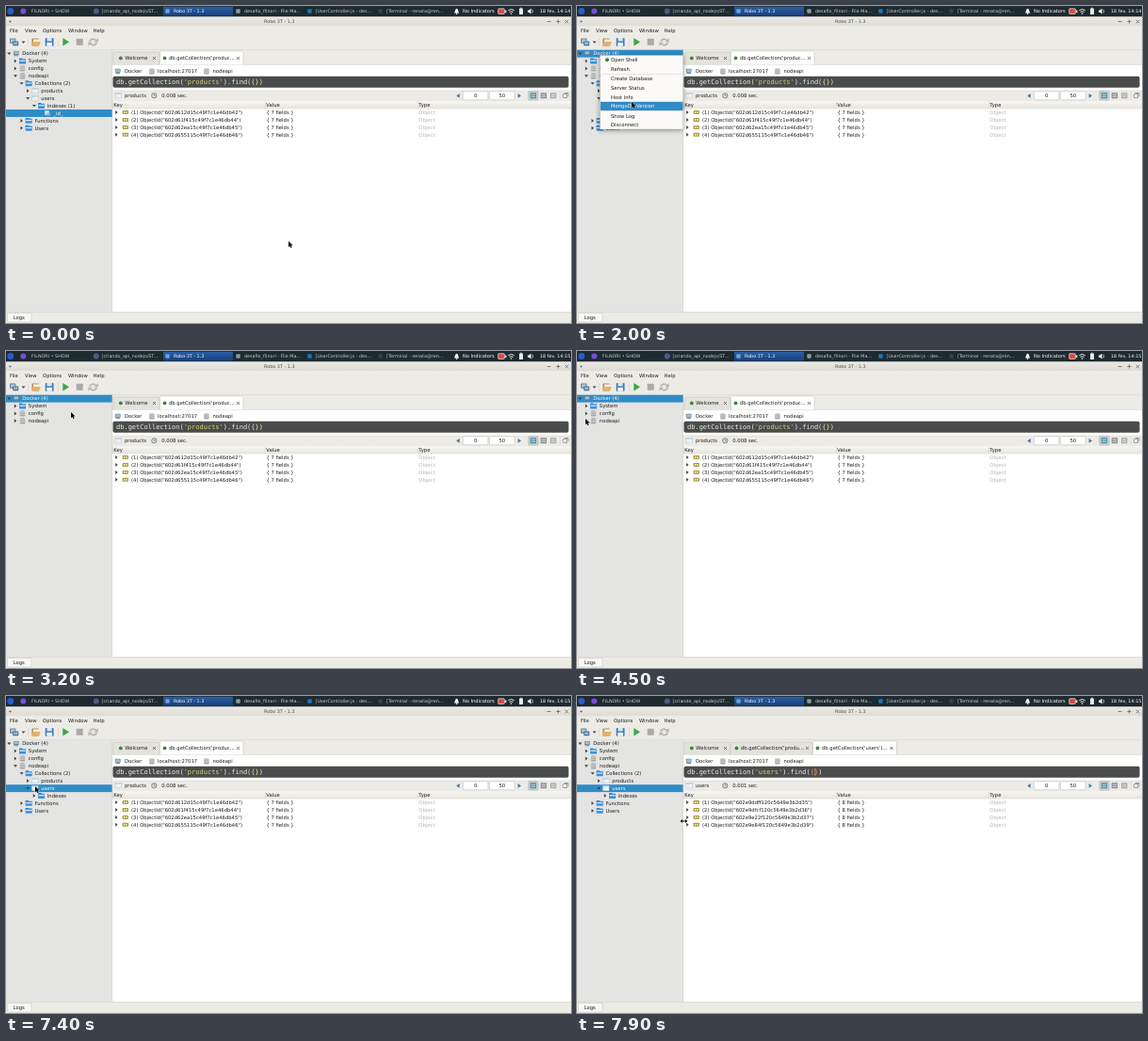
Recreate the animation shown at these times as an HTML page. Size 600 by 337 pixels, loop 8000 ms.

```html
<!DOCTYPE html>
<html lang="en">
<head>
<meta charset="utf-8">
<title>Database browser</title>
<style>
html, body { margin: 0; width: 100%; height: 100%; overflow: hidden; background: #edebe5; }
svg { display: block; width: 100vw; height: 100vh; }
text { font: 5.27px "DejaVu Sans", sans-serif; fill: #1c1c1c; text-rendering: geometricPrecision; white-space: pre; }
.task { font-size: 4.85px; fill: #c3cccf; }
.task.on { fill: #fff; }
.title { font-size: 4.9px; fill: #505050; }
.code { font: 7.01px "DejaVu Sans Mono", monospace; fill: #ececea; }
.picked { fill: #fff; }
.shadow { filter: drop-shadow(0 1.5px 2.5px #0006); }
</style>
</head>
<body>
<svg id="stage" viewBox="0 0 600 337" preserveAspectRatio="none">
  <defs>
    <linearGradient id="head" x2="0" y2="1"><stop stop-color="#f7f6f3"/><stop offset="1" stop-color="#e6e4de"/></linearGradient>
    <linearGradient id="bar" x2="0" y2="1"><stop stop-color="#ebe9e4"/><stop offset="1" stop-color="#dfdcd5"/></linearGradient>
    <linearGradient id="active" x2="0" y2="1"><stop stop-color="#2a5fa8"/><stop offset="1" stop-color="#193f78"/></linearGradient>
    <pattern id="stripes" width="7.3" height="6.4" patternUnits="userSpaceOnUse" x="322" y="204.3">
      <rect width="7.3" height="6.4" fill="#f0f0ee"/><path d="M0 6.4L3.2 0H7L3.8 6.4Z" fill="#747472"/>
    </pattern>
  </defs>
  <g id="frame"></g>
  <g id="tools"></g>
  <g id="tree"></g>
  <g id="doc"></g>
  <g id="menu"></g>
  <g id="pointer"></g>
</svg>
<script>
const LOOP = 8000, STEP = 100, BLUE = '#308cc6', GREEN = '#3c8436';
const $ = id => document.getElementById(id);

// Drawing helpers
const rect = (x, y, w, h, fill, more = '') =>
  `<rect x="${x}" y="${y}" width="${w}" height="${h}" fill="${fill}" ${more}/>`;
const dot = (x, y, r, fill) => `<circle cx="${x}" cy="${y}" r="${r}" fill="${fill}"/>`;
const path = (d, fill, more = '') => `<path d="${d}" fill="${fill}" ${more}/>`;
const line = (d, color, w = 0.6) => path(d, 'none', `stroke="${color}" stroke-width="${w}"`);
const text = (x, y, s, more = '') => `<text x="${x}" y="${y + 1.85}" ${more}>${s}</text>`;
const cross = (x, y, r, color, w) => line(`M${x - r} ${y - r}l${2 * r} ${2 * r}m0 ${-2 * r}l${-2 * r} ${2 * r}`, color, w);

const icons = {
  host: (x, y) => rect(x + 0.6, y - 2.7, 5.6, 4, '#6f7f8b', 'rx=".5"') + rect(x + 1.2, y - 2.1, 4.4, 2.7, '#9cc0d8') +
    rect(x + 1.2, y + 1.7, 4.4, 0.9, '#70797f'),
  folder: (x, y) => rect(x, y - 3, 3.4, 2, '#2a7bc8', 'rx=".4"') + rect(x, y - 2.3, 7, 5.2, '#3a8edb', 'rx=".5"') +
    rect(x + 0.5, y - 0.9, 6, 1.2, '#dceefa'),
  db: (x, y) => rect(x + 0.7, y - 3, 5.4, 6.1, '#a3a5a5', 'rx="1.3"') +
    line(`M${x + 0.9} ${y - 1.4}h5M${x + 0.9} ${y + 0.8}h5`, '#eee', 0.7),
  table: (x, y) => rect(x + 0.2, y - 2.7, 6.5, 5.3, '#f6fafc', 'stroke="#a9bac4" stroke-width=".4"') +
    rect(x + 0.2, y - 2.7, 6.5, 1.3, '#b5d3e5') + line(`M${x + 2.4} ${y - 1.4}v4M${x + 0.2} ${y + 0.6}h6.5`, '#c5d3da', 0.4),
  index: (x, y) => rect(x + 0.5, y - 2.7, 4.6, 4.4, '#d9e6ee', 'rx=".4"') + rect(x + 2.8, y - 0.4, 3.4, 3, '#a5b4be', 'rx=".4"'),
  object: (x, y) => rect(x + 0.2, y - 2, 6.4, 4, '#a89a45', 'rx=".8"') + rect(x + 1.6, y - 1, 1.3, 2, '#f4eebc') +
    rect(x + 3.9, y - 1, 1.3, 2, '#f4eebc')
};

const twist = (x, y, open) => path(open
  ? `M${x - 2} ${y - 1.1}h4l-2 2.4Z` : `M${x - 1.1} ${y - 2}v4l2.4 -2Z`, '#3f3f3f');

// Panel, title bar, menu bar and status bar
function drawFrame(clock) {
  const tasks = [
    [27, 'FILNORI • SHOW', 18.3, '#7d49e0'], [101.5, '[criando_api_nodejs/ST...', 95.8, '#4b5c86'],
    [178, 'Robo 3T - 1.3', 171.5, '#6f9fdc'], [253, 'desafio_filnori - File Ma...', 246.5, '#8a9aa5'],
    [328.5, '[UserController.js - des...', 322.5, '#1679c4'], [404, '[Terminal - renata@ren...', 397.5, '#34454d']
  ];
  let s = rect(0, 0, 600, 11.5, '#1d2a2f') + rect(167, 0.8, 74, 9.8, 'url(#active)') + dot(4.8, 5.5, 3.4, '#2a5bd0');
  tasks.forEach(([x, label, ix, color], i) => {
    s += i > 1 ? rect(ix - 2.2, 3.3, 4.4, 4.4, color, 'rx="1"') : dot(ix, 5.5, 3, color);
    s += text(x, 5.5, label, `class="task ${i == 2 ? 'on' : ''}"`);
  });
  s += path('M476 7.4c1-1 .9-4.6 2.6-4.6s1.6 3.6 2.6 4.6Z', '#fff') + dot(478.6, 8.3, 0.8, '#fff') +
    text(485, 5.5, 'No Indicators', 'class="task on" style="font-size:5.1px"') +
    rect(522.7, 2.8, 6.6, 5.6, '#d6483c', 'stroke="#eee" stroke-width=".7" rx=".6"') + path('M529.3 5.4l2-1.4v3.6l-2-1.4Z', '#eee') +
    line('M533.3 4.7q3.2-2.6 6.4 0M534.5 6.4q2-1.5 4 0', '#fff', 0.9) + dot(536.5, 8, 0.8, '#fff') +
    rect(545, 2.5, 4, 6.5, '#dfeedd', 'rx=".6"') + rect(546.2, 1.7, 1.6, 1, '#dfeedd') +
    path('M554 4.4h1.5l2-1.8v6l-2-1.8h-1.5Z', '#fff') + line('M558.8 3.7q1.6 1.9 0 3.8', '#fff', 0.7) +
    text(567, 5.5, '18 fev, ' + clock, 'class="task on"');

  s += rect(0, 11.5, 600, 9.7, 'url(#bar)') + text(274, 16.6, 'Robo 3T - 1.3', 'class="title"') +
    path('M2.8 15.8h3.2l-1.6 1.9Z', '#666') + line('M574.5 16.5h4M584.3 16.5h4.2M586.4 14.4v4.2', '#666', 0.8) +
    cross(595.5, 16.5, 1.8, '#666', 0.8);
  s += rect(0, 21.2, 600, 315.8, '#edebe5');
  [[4, 'File'], [20, 'View'], [39, 'Options'], [66, 'Window'], [92.5, 'Help']]
    .forEach(([x, label]) => s += text(x, 25.7, label));
  s += rect(0, 46, 600, 0.5, '#d2d0ca') + rect(0, 325, 600, 0.5, '#cfcdc7') +
    rect(1.5, 326.4, 25.5, 9.6, '#f8f7f5', 'stroke="#c2c0ba" stroke-width=".5" rx="1"') + text(7.7, 331.5, 'Logs');
  $('frame').innerHTML = s;
}

function drawTools(busy) {
  const stop = busy ? '#dd4f28' : '#a9a9a7', play = busy ? '#b0b0ae' : '#3ea548';
  $('tools').innerHTML =
    rect(4, 34.5, 6.4, 5.2, '#6d7c87', 'rx=".6"') + rect(4.9, 35.4, 4.6, 3.2, '#9fcbe8') + rect(7.2, 37.6, 6, 4.6, '#4a6c86', 'rx=".6"') +
    rect(8, 38.4, 4.4, 2.7, '#8db6d2') + path('M16.5 37.4h4l-2 2.4Z', '#444') + rect(23.5, 34, 0.5, 9, '#cfcdc6') +
    rect(27.4, 34.4, 7.4, 8, '#b98a4e', 'rx=".6"') + rect(29, 35.4, 6, 3, '#f3efe6') + path('M28.4 38h8.2l-1.4 4.5h-7.8Z', '#e2b268') +
    rect(41.7, 34, 8.8, 8.8, '#3d78b8', 'rx=".8"') + rect(43.5, 34, 5.2, 3.4, '#d7e6f3') + rect(43.2, 38.8, 5.8, 4, '#eef4fa') +
    rect(55, 34, 0.5, 9, '#cfcdc6') + path('M60.3 34v8.6l6.8-4.3Z', play) + rect(74.7, 34.8, 7, 7, stop, 'rx=".5"') +
    line('M88.7 37.4q3.4-4 7-.8M96.5 39.4q-3.4 4-7 .8', '#b4b4b1', 1.7) +
    path('M97.8 34v4.4h-4.2ZM87.4 42.8v-4.4h4.2Z', '#b4b4b1');
}

// Tree: label, depth, icon, has children, minimum level of expansion
const nodes = [
  ['Docker (4)', 0, 'host', 1, 0], ['System', 1, 'folder', 1, 0], ['config', 1, 'db', 1, 0], ['nodeapi', 1, 'db', 1, 0],
  ['Collections', 2, 'folder', 1, 1], ['products', 3, 'table', 1, 2], ['users', 3, 'table', 1, 2],
  ['Indexes', 4, 'folder', 1, 3], ['_id_', 5, 'index', 0, 4],
  ['Functions', 2, 'folder', 1, 1], ['Users', 2, 'folder', 1, 1]
];
const opensAt = { 'Docker (4)': 0, nodeapi: 1, Collections: 2, users: 3, Indexes: 4 };

function drawTree(level, chosen) {
  let s = rect(0, 46.5, 112.6, 278.5, '#e4e4e2') + rect(112.6, 46.5, 0.5, 278.5, '#c6c6c3');
  nodes.filter(n => n[4] <= level).forEach(([label, depth, icon, kids], i) => {
    const y = 50.6 + 7.92 * i, x = 6.65 * depth, on = label == chosen;
    const count = label == 'Collections' && level > 1 ? ' (2)' : label == 'Indexes' && level > 3 ? ' (1)' : '';
    if (on) s += rect(0, y - 3.9, 112.6, 7.9, BLUE);
    if (kids) s += twist(3.3 + x, y, level >= opensAt[label]);
    s += icons[icon](7.4 + x, y) + text(17.2 + x, y, label + count, on ? 'class="picked"' : '');
  });
  $('tree').innerHTML = s;
}

function tab(x, w, label, tx, active) {
  const top = active ? 48 : 49;
  return path(`M${x} 62.3V${top + 1.5}q0-1.5 1.5-1.5h${w - 3}q1.5 0 1.5 1.5V62.3`, active ? '#fff' : '#e4e2dc', 'stroke="#bfbdb7" stroke-width=".5"') +
    dot(tx - 4.5, 55.4, 1.9, GREEN) + text(tx, 55.4, label) + cross(x + w - 5.5, 55.5, 1.4, '#555', 0.9);
}

function drawRows(fields, ids) {
  let s = rect(113.1, 101.3, 487, 8, 'url(#head)') + rect(113.1, 109, 487, 0.4, '#c9c7c1') + rect(113.1, 109.4, 487, 215.6, '#fff');
  [[114.3, 'Key'], [276.3, 'Value'], [438.3, 'Type']].forEach(([x, label]) => {
    s += text(x, 105.1, label) + rect(x - 1.2, 101.5, 0.4, 7.5, '#c9c7c1');
  });
  ids.forEach((id, i) => {
    const y = 113.1 + 7.9 * i;
    s += twist(117.3, y, false) + icons.object(123.4, y) + text(133, y, `(${i + 1}) ObjectId("${id}")`) +
      text(276.5, y, `{ ${fields} fields }`) + text(438.3, y, 'Object', 'style="fill:#b4b4b4"');
  });
  return s;
}

function drawStatus(name, secs) {
  const box = (x, label) => rect(x, 90.8, 26.6, 9, '#fff', 'stroke="#b9b7b1" stroke-width=".5" rx=".8"') +
    text(x + 13.3, 95.3, label, 'text-anchor="middle"');
  const view = (x, color) => rect(x, 92.3, 6.4, 6, color, 'rx=".5"') +
    line(`M${x + 1} 94.2h4.4M${x + 1} 96.3h4.4`, '#eef2f2', 0.8);
  return icons.table(115.7, 95.3) + text(126, 95.3, name) +
    dot(157.3, 95.3, 3, '#8d8d8b') + dot(157.3, 95.3, 2, '#e4e4e0') + line('M157.3 93.6v1.8h1.4', '#555', 0.6) + text(165.3, 95.3, secs + ' sec.') +
    path('M481.6 93v4.8l-3.4-2.4Z', '#3b78b5') + box(485.3, 0) + box(513.5, 50) + path('M543.6 93v4.8l3.4-2.4Z', '#3b78b5') +
    rect(554.8, 90.6, 10.2, 9.5, '#cdd2d2', 'stroke="#a2a6a5" stroke-width=".5" rx="1"') + view(556.7, '#4b8fa6') +
    view(567.7, '#858d94') + view(578, '#a9aaa9') + rect(588, 91, 0.4, 9, '#c9c7c1') +
    rect(591.7, 93.7, 4, 3.8, '#fff', 'stroke="#666" stroke-width=".6"') + line('M593 92.5h4v3.8', '#666');
}

const productIds = ['12d', '1f4', '2ea', '551'].map((mid, i) => `602d6${mid}15c49f7c1e46db4${[2, 4, 5, 6][i]}`);
const userIds = ['ddf', 'dfc', 'e22', 'e84'].map((mid, i) => `602e9${mid}f120c5649e3b2d3${[5, 6, 7, 9][i]}`);

function drawDoc(mode) {
  const first = mode == 'products', busy = mode == 'loading', name = first ? 'products' : 'users';
  let s = rect(113.1, 62.3, 487, 27.7, '#fff') + rect(113.1, 62.1, 487, 0.4, '#bfbdb7');
  s += tab(114, 49, 'Welcome', 126.3, false);
  if (first) s += tab(163.5, 88.5, "db.getCollection('produc...", 173, true);
  else s += tab(163, 87, "db.getCollection('produ...", 174, false) + (busy
    ? tab(250.5, 47.5, 'nodeapi', 262, true) : tab(250.5, 89, "db.getCollection('users')...", 260, true));
  s += icons.host(115.3, 69.4) + text(126, 69.4, 'Docker') + icons.db(151.5, 69.4) + text(161, 69.4, 'localhost:27017') +
    icons.db(209.5, 69.4) + text(219.5, 69.4, busy ? 'loading...' : 'nodeapi');

  const brace = first ? '#f3e09a' : '#ff8861';
  s += rect(113.5, 74.7, 484, 12.1, '#494c4a', 'rx="1.8"') +
    `<text class="code" x="117" y="83.1">db.getCollection(<tspan fill="#d5d070">'${name}'</tspan>).find(<tspan fill="${brace}">{}</tspan>)</text>`;
  if (!first) s += rect(252.6, 76.6, 0.6, 8.4, '#ffb39a');
  s += rect(113.1, 90, 487, 235, '#edebe5') + rect(113.1, 89.8, 487, 0.4, '#cbc9c3');
  s += busy
    ? rect(316, 200, 80.5, 14.3, '#dedcd7', 'rx="1.5"') + rect(320, 204.3, 72.5, 6.4, 'url(#stripes)', 'stroke="#747472" stroke-width=".6" rx=".6"')
    : drawStatus(name, first ? '0.008' : '0.001') + drawRows(first ? 7 : 8, first ? productIds : userIds);
  $('doc').innerHTML = s;
}

const items = [['Open Shell', 57.3], ['Refresh', 67], ['Create Database', 77.3], ['Server Status', 87],
  ['Host Info', 96.7], ['MongoDB Version', 106.3], ['Show Log', 117], ['Disconnect', 126.5]];

function drawMenu(shown, py) {
  if (!shown) return $('menu').innerHTML = '';
  let s = rect(24.5, 52.4, 88.3, 78.6, '#fbfaf8', 'class="shadow" stroke="#b5b3ae" stroke-width=".4"') +
    rect(26, 72, 85.5, 0.4, '#c8c6c1') + rect(26, 111.6, 85.5, 0.4, '#c8c6c1') + dot(32, 57.3, 2, GREEN);
  for (const [label, y] of items) {
    const on = Math.abs(py - y) < 4.8;
    if (on) s += rect(25, y - 4.5, 87.5, 9.3, BLUE);
    s += text(36, y, label, on ? 'class="picked"' : '');
  }
  $('menu').innerHTML = s;
}

// Pointer path: time, x, y
const way = [[0, 300, 250], [900, 2, 32], [1400, 21, 50], [1600, 24, 50], [2000, 58, 102], [2400, 62, 95], [2900, 69, 65],
  [3200, 69, 65], [3500, 37, 62], [3600, 37, 62], [4500, 9, 72], [4900, 9, 72], [5600, 16, 81], [5800, 16, 81],
  [6300, 28, 99], [6400, 28, 99], [6500, 28, 105], [6600, 28, 105], [7400, 31, 96], [7500, 31, 96], [7900, 113.5, 133]];

function pointerAt(t) {
  const i = way.findIndex(p => p[0] > t);
  if (i < 0) return way[way.length - 1].slice(1);
  const [t0, x0, y0] = way[i - 1], [t1, x1, y1] = way[i];
  const u = (t - t0) / (t1 - t0), k = u * u * (3 - 2 * u);
  return [x0 + (x1 - x0) * k, y0 + (y1 - y0) * k];
}

function drawPointer(x, y, resize) {
  const shape = resize ? 'M-3.8 0l2.2-2v1.4h3.2v-1.4l2.2 2l-2.2 2v-1.4h-3.2v1.4Z' : 'M0 0v6.2l1.5-1.3l1 2.3l1.1-.5l-1-2.2h2Z';
  $('pointer').innerHTML = path(shape, '#000', `transform="translate(${x} ${y})" stroke="#fff" stroke-width=".7" paint-order="stroke"`);
}

// Value of the last [start, value] entry reached
const pick = (t, table) => table.filter(e => e[0] <= t).pop()[1];
const cache = {};
function update(draw, ...args) {
  const key = args.join('|');
  if (cache[draw.name] !== key) { cache[draw.name] = key; draw(...args); }
}

function render(now) {
  const t = Math.floor(now % LOOP / STEP) * STEP;
  const [x, y] = pointerAt(t);
  const mode = pick(t, [[0, 'products'], [7500, 'loading'], [7600, 'users']]);
  update(drawFrame, t < 2700 ? '14:14' : '14:15');
  update(drawTools, mode == 'loading');
  update(drawTree, pick(t, [[0, 4], [3200, 0], [4900, 1], [5700, 2], [7300, 3]]),
    pick(t, [[0, '_id_'], [1600, 'Docker (4)'], [4600, 'nodeapi'], [7100, 'users']]));
  update(drawDoc, mode);
  update(drawMenu, t >= 1600 && t < 3200, y);
  update(drawPointer, x, y, t >= 7900);
}

const start = performance.now();
function tick() {
  render(performance.now() - start);
  requestAnimationFrame(tick);
}
tick();
</script>
</body>
</html>
```
